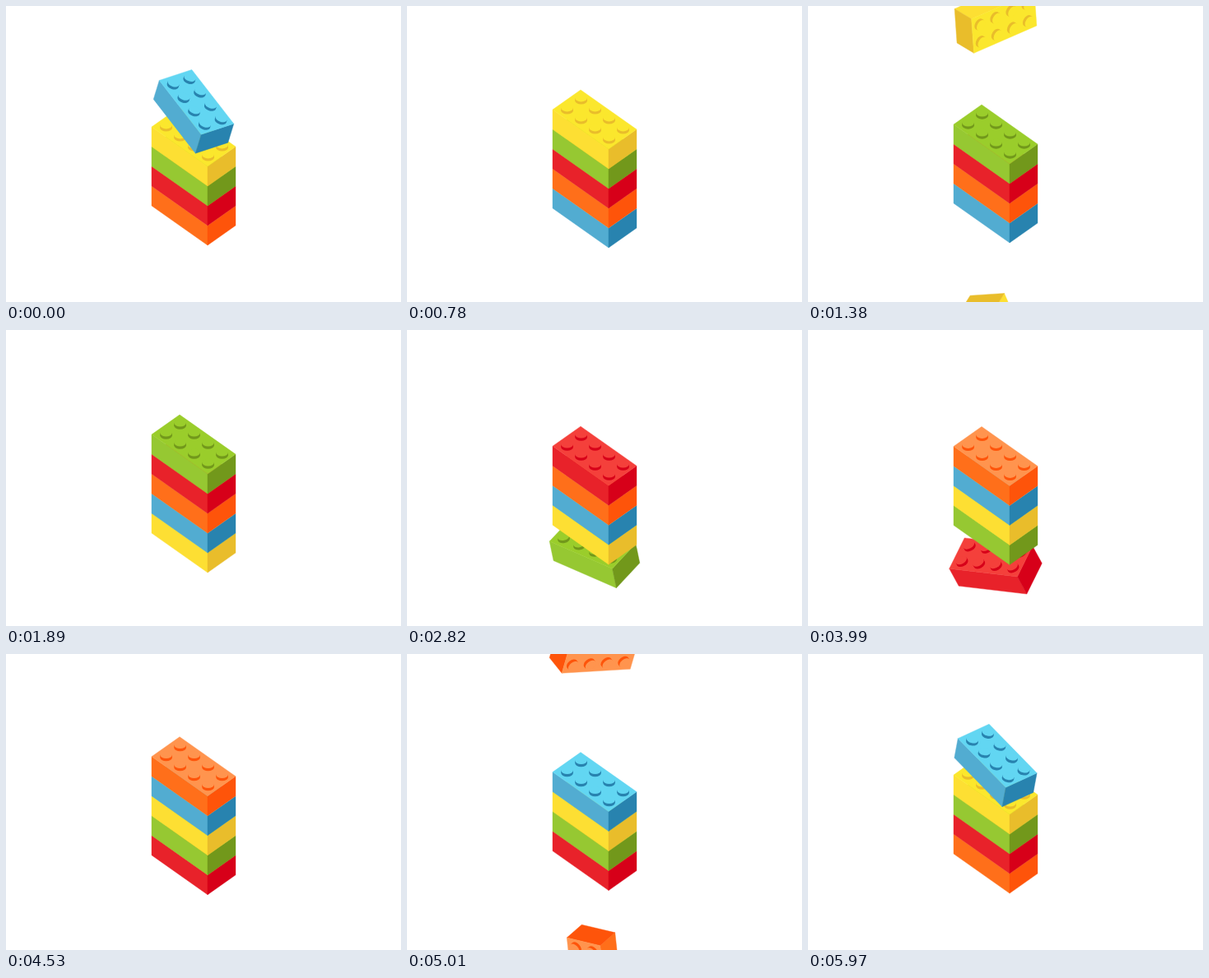
An HTML page with a canvas for the animation above (6 s loop, 480x360 px).

```html
<!DOCTYPE html>
<html lang="en">
<head>
<meta charset="utf-8">
<title>Brick stack</title>
<style>
  html, body { margin: 0; width: 100%; height: 100%; overflow: hidden; background: #fff; }
  canvas { display: block; width: 480px; height: 360px; }
</style>
</head>
<body>
<canvas id="stage" width="480" height="360"></canvas>
<script>
const ctx = document.getElementById('stage').getContext('2d');

const STEP = 30, CYCLE = 1200, LOOP = 6000;
const CX = 228, H = 24, HALF = 48, JOIN = 440, LIFT_START = -135;

// Colours in the order in which the bricks leave the top
const COLORS = [
  { top: '#62d6f2', left: '#52acd1', right: '#2883af' },
  { top: '#fbe72d', left: '#fddf33', right: '#e9bd2b' },
  { top: '#9acd2b', left: '#96c832', right: '#72981b' },
  { top: '#f4403b', left: '#e8222a', right: '#d70019' },
  { top: '#ff944e', left: '#ff6f1a', right: '#fe540a' }
];

// Brick corners relative to its centre
const B = [-17, -48], L = [-51, -24], F = [17, 24], R = [51, 0];
const down = ([x, y]) => [x, y + H];

// Smooth monotone curve through [time, value] points
function curve(pts) {
  const n = pts.length;
  const d = [];
  for (let i = 0; i < n - 1; i++) {
    d.push((pts[i + 1][1] - pts[i][1]) / (pts[i + 1][0] - pts[i][0]));
  }
  const m = pts.map((_, i) => {
    if (i === 0) return d[0];
    if (i === n - 1) return d[n - 2];
    const a = d[i - 1], b = d[i];
    return a * b <= 0 ? 0 : 2 * a * b / (a + b);
  });
  return t => {
    if (t <= pts[0][0]) return pts[0][1];
    if (t >= pts[n - 1][0]) return pts[n - 1][1];
    let i = 0;
    while (t > pts[i + 1][0]) i++;
    const h = pts[i + 1][0] - pts[i][0];
    const s = (t - pts[i][0]) / h, s2 = s * s, s3 = s2 * s;
    return (2 * s3 - 3 * s2 + 1) * pts[i][1] + (s3 - 2 * s2 + s) * h * m[i]
      + (3 * s2 - 2 * s3) * pts[i + 1][1] + (s3 - s2) * h * m[i + 1];
  };
}

// Top of the four standing bricks: slow drift, then a push from below
const drift = curve([[0, 123], [210, 119.6], [390, 117.5], [JOIN, 117]]);
const push = curve([[JOIN, 117], [500, 111.3], [560, 107.1], [630, 104.3],
  [690, 103.1], [780, 102], [870, 101.2], [1170, 99.1], [1200, 99]]);
const stackTop = p => p < JOIN ? drift(p) : push(p);

// Spin of the leaving brick; its rise follows the spin
const spinOut = curve([[LIFT_START, 0], [-90, 2.2], [-30, 10.5], [0, 17],
  [60, 44], [120, 81], [210, 141.4], [330, 220]]);
const RISE = 1.1;

// Brick coming in from below
const spinIn = curve([[90, -200], [210, -131.4], [390, -28.5], [420, -11.7], [JOIN, 0]]);
const riseIn = curve([[90, 447], [210, 383.3], [390, 287], [420, 270.2], [JOIN, 261]]);

function face(pts, color) {
  ctx.beginPath();
  pts.forEach(([x, y]) => ctx.lineTo(x, y));
  ctx.closePath();
  ctx.fillStyle = ctx.strokeStyle = color;
  ctx.fill();
  ctx.stroke();
}

function disc(x, y, color) {
  ctx.beginPath();
  ctx.ellipse(x, y, 7.3, 4.4, 0, 0, Math.PI * 2);
  ctx.fillStyle = color;
  ctx.fill();
}

function stud(x, y, c) {
  disc(x, y + 1.2, c.right);
  ctx.fillRect(x - 7.3, y - 2, 14.6, 3.2);
  disc(x, y - 2, c.top);
}

function brick(y, deg, c) {
  ctx.save();
  ctx.translate(CX, y);
  ctx.rotate(deg * Math.PI / 180);
  ctx.lineWidth = 0.4;
  ctx.lineJoin = 'round';
  face([L, F, down(F), down(L)], c.left);
  face([F, R, down(R), down(F)], c.right);
  face([B, R, F, L], c.top);
  for (let row = 1; row >= 0; row--) {
    for (let i = 0; i < 4; i++) {
      stud(L[0] + 17.6 + 17 * (i + row), L[1] + 12 * (i - row), c);
    }
  }
  ctx.restore();
}

function draw(t) {
  ctx.fillStyle = '#fff';
  ctx.fillRect(0, 0, 480, 360);

  const k = Math.floor(t / CYCLE), p = t % CYCLE;
  const color = i => COLORS[(k + i) % COLORS.length];
  const first = stackTop(p) + HALF;

  if (p < JOIN) brick(riseIn(p), spinIn(p), color(0));
  else brick(first + 4 * H, 0, color(0));

  for (let i = 3; i > 0; i--) brick(first + i * H, 0, color(i + 1));

  const turn = spinOut(p - CYCLE);
  brick(first - turn * RISE, turn, color(1));

  if (p < 330) {
    const spin = spinOut(p);
    brick(stackTop(CYCLE) + HALF - spin * RISE, spin, color(0));
  }
}

const start = performance.now();
function tick() {
  const t = Math.max(0, performance.now() - start) % LOOP;
  draw(Math.floor(t / STEP) * STEP);
  requestAnimationFrame(tick);
}
tick();
</script>
</body>
</html>
```
